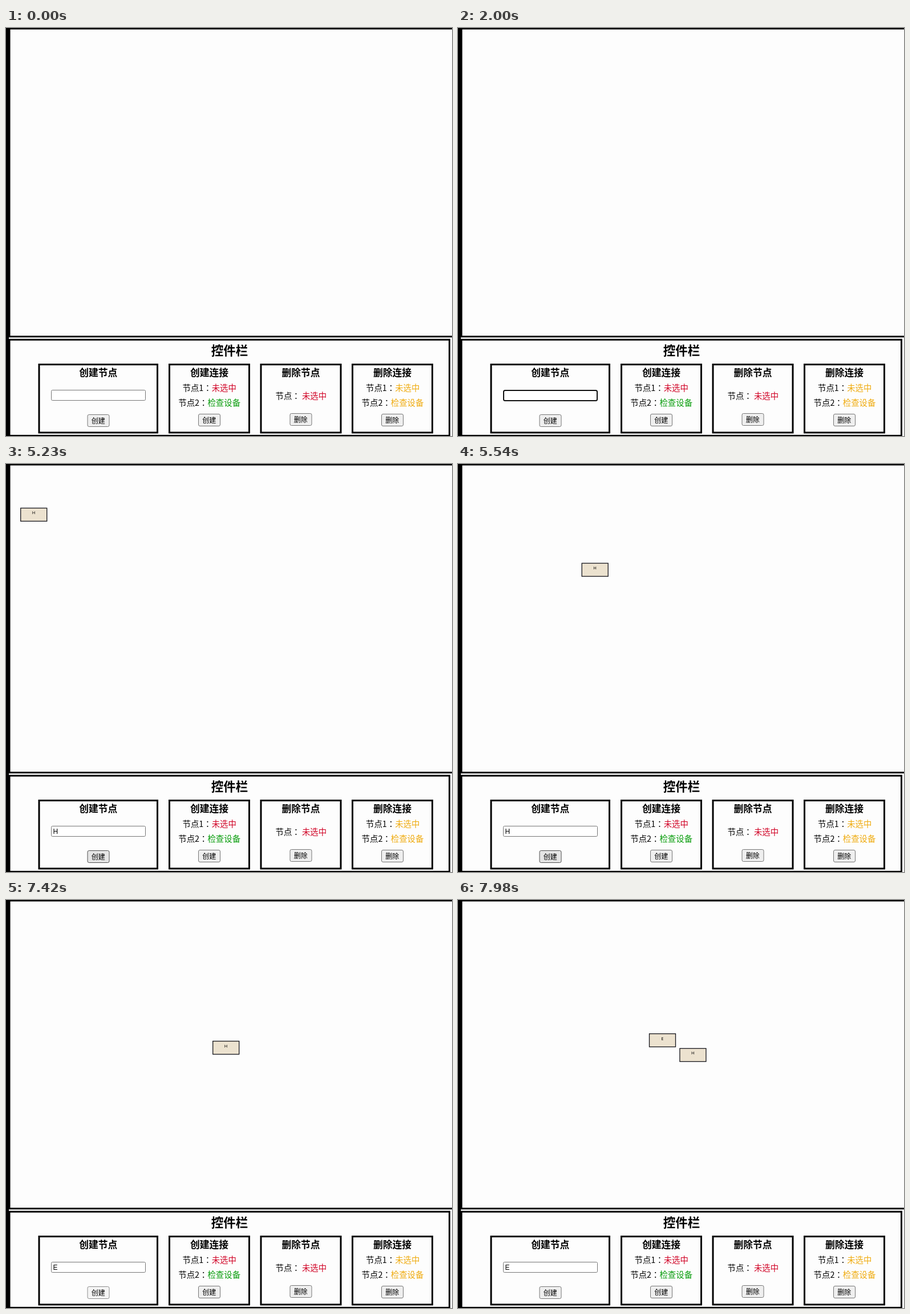
Recreate the animation shown at these times as an HTML page. Size 782 px wide and 716 px high, loop 8 s.

```html
<!DOCTYPE html>
<html>
<head>
<meta charset="utf-8">
<style>
html, body { margin: 0; width: 100%; height: 100%; overflow: hidden; background: #fdfdfd; }
svg { display: block; }
text { font-family: "Noto Sans CJK JP", "Noto Sans CJK SC", "Noto Sans CJK", sans-serif; white-space: pre; }
.mid { text-anchor: middle; }
.title { font-size: 21.5px; font-weight: bold; }
.head { font-size: 16.8px; font-weight: bold; }
.row { font-size: 14.4px; }
.label { font-size: 12px; }
.value { font: 12px "Liberation Sans", Arial, sans-serif; }
.name { font: 7.5px "Noto Sans", sans-serif; }
.frame { fill: none; stroke: #000; stroke-width: 3; }
.node { fill: #ece2cf; stroke: #15151c; stroke-width: 1.3; }
.red { fill: #d00024; }
.green { fill: #069c0a; }
.amber { fill: #efaa0c; }
</style>
</head>
<body>
<svg id="stage" width="782" height="716" viewBox="0 0 782 716"></svg>
<script>
const LOOP = 8000;
const stage = document.getElementById("stage");

function add(tag, attrs, parent = stage, content = "") {
  const el = document.createElementNS("http://www.w3.org/2000/svg", tag);
  set(el, attrs);
  el.textContent = content;
  return parent.appendChild(el);
}
function set(el, attrs) {
  for (const key in attrs) el.setAttribute(key, attrs[key]);
}
const show = (el, on) => set(el, { visibility: on ? "visible" : "hidden" });

// Rectangle given by its outer edges, with the stroke drawn inside.
function outline(x, y, right, bottom, attrs, width = 1) {
  return add("rect", {
    x: x + width / 2, y: y + width / 2,
    width: right - x - width, height: bottom - y - width,
    "stroke-width": width, ...attrs
  });
}
function button(x, y, label) {
  const box = outline(x, y, x + 39, y + 22, { rx: 2.5 });
  add("text", { class: "label mid", x: x + 19.3, y: y + 15.5 }, stage, label);
  return box;
}
function row(x, y, label, status, color) {
  const line = add("text", { class: "row", x, y }, stage, label);
  add("tspan", { class: color }, line, status);
}
function panel(x, right, heading) {
  outline(x, 589, right, 711.5, { class: "frame" }, 3);
  add("text", { class: "head mid", x: (x + right) / 2, y: 611.3 }, stage, heading);
}
function makeNode(name) {
  const g = add("g", {});
  add("rect", { class: "node", x: 0.7, y: 0.7, width: 46, height: 23 }, g);
  add("text", { class: "name mid", x: 23.6, y: 11.7 }, g, name);
  return g;
}

add("rect", { width: 5, height: 716 });
outline(4.5, -0.5, 800, 543, { class: "frame" }, 3);
outline(4.5, 545.5, 779, 717, { class: "frame" }, 3);
add("text", { class: "title mid", x: 392, y: 573.6 }, stage, "控件栏");

panel(56.5, 267, "创建节点");
panel(285, 428, "创建连接");
panel(445.5, 588.5, "删除节点");
panel(606, 749, "删除连接");

row(309.5, 637.4, "节点1：", "未选中", "red");
row(302.3, 663.4, "节点2：", "检查设备", "green");
row(472.5, 650.8, "节点： ", "未选中", "red");
row(631, 637.4, "节点1：", "未选中", "amber");
row(623.6, 663.4, "节点2：", "检查设备", "amber");

const createButton = button(142.5, 678, "创建");
for (const [x, y, label] of [[337, 677, "创建"], [497.5, 676, "删除"], [658, 677, "删除"]])
  set(button(x, y, label), { fill: "#efefef", stroke: "#767676" });

const idleInput = outline(79, 635, 245, 654, { fill: "#fff", stroke: "#767676", rx: 2 });
const focusedInput = outline(79, 635, 245, 655, { fill: "#fff", stroke: "#101010", rx: 2.5 }, 2);
const value = add("text", { class: "value", x: 82.5, y: 649 });
const caret = add("rect", { y: 638.5, width: 1, height: 13 });

const nodeH = makeNode("H");
const nodeE = makeNode("E");

const within = (t, spans) => spans.some(([from, to]) => t >= from && t < to);
function glide(t, from, to) {
  const p = Math.min(1, Math.max(0, (t - from) / (to - from)));
  return p * p * (3 - 2 * p);
}
const place = (el, a, b, p) => set(el, {
  transform: `translate(${a[0] + (b[0] - a[0]) * p} ${a[1] + (b[1] - a[1]) * p})`
});

function draw(t) {
  const focused = within(t, [[1450, 5030], [5870, 7420]]);
  show(idleInput, !focused);
  show(focusedInput, focused);

  const typed = within(t, [[3830, 6350]]) ? "H" : t >= 6840 ? "E" : "";
  value.textContent = typed;
  set(caret, { x: { "": 82, H: 91, E: 90.5 }[typed] });
  show(caret, within(t, [[1450, 2000], [2560, 3200], [3830, 4440], [5870, 7420]]));

  const pressed = within(t, [[5030, 5230], [7420, 7510]]);
  const hovered = within(t, [[4730, 5600], [7020, 7420]]);
  set(createButton, {
    fill: pressed ? "#f5f5f5" : hovered ? "#e5e5e5" : "#efefef",
    stroke: pressed ? "#8d8d8d" : hovered ? "#4f4f4f" : "#767676"
  });

  const center = [362, 247];
  const second = glide(t, 7490, 7980);
  show(nodeH, t >= 5230);
  show(nodeE, t >= 7510);
  if (t < 7490) place(nodeH, [25, 76.7], center, glide(t, 5230, 5800));
  else place(nodeH, center, [388.2, 259.8], second);
  place(nodeE, [18, 83], [334.8, 234], second);
}

function tick() {
  draw(performance.now() % LOOP);
  requestAnimationFrame(tick);
}
tick();
</script>
</body>
</html>
```
